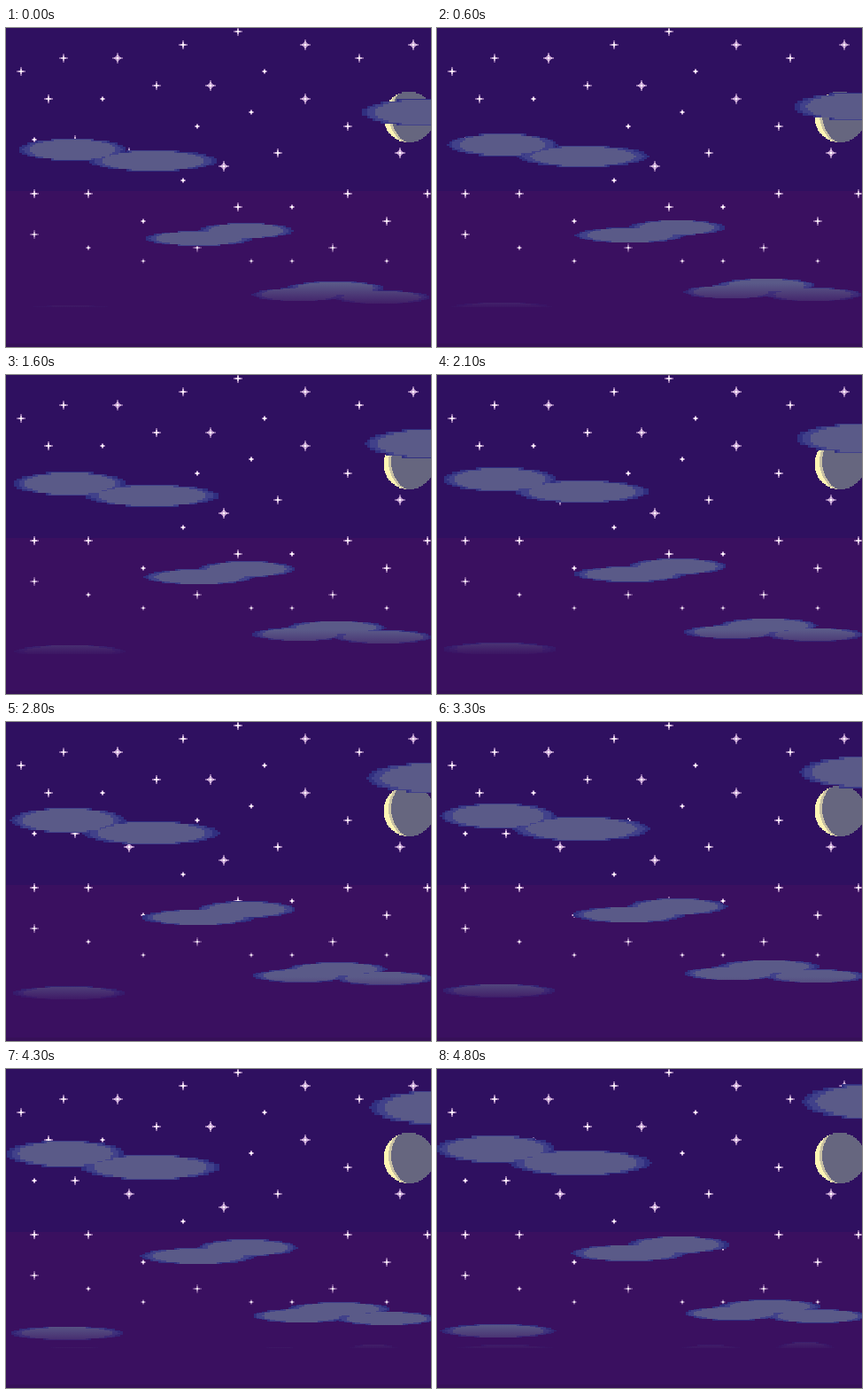
An HTML page with a canvas that plays this animation: 480x360 px, repeating every 4900 ms.

```html
<!DOCTYPE html>
<html lang="en">
<head>
<meta charset="utf-8">
<title>Night sky</title>
<style>
  html, body { margin: 0; width: 100%; height: 100%; overflow: hidden; background: #3a1060; }
  canvas { display: block; }
</style>
</head>
<body>
<canvas id="sky" width="480" height="360"></canvas>
<script>
const ctx = document.getElementById('sky').getContext('2d');
const STEPS = 49, HAZE = '58,16,96', CELL = 15.29;

// Stars sit on a coarse grid: the columns taken in each row
const starRows = [
  [17], [13, 22, 30], [4.15, 8.1, 26], [1, 19], [11, 15], [3, 7, 22], [18], [14, 25.15],
  [2, 5], [9, 20, 29], [16], [13], [2, 6, 25.15, 31], [17, 21], [10, 28], [2],
  [6, 14, 24], [10, 18, 21, 28]
];

// Each cloud is a group of lobes, given halfway through the loop: x, y, half width
const clouds = [
  [[70.5, 115, 64], [164, 129, 76]],
  [[480, 68, 73]],
  [[217.5, 223, 63], [272, 214, 55]],
  [[333, 288.5, 54], [374, 281, 56], [427, 291.5, 56]],
  [[71, 308, 63], [79, 331, 62]],
  [[308, 331, 38], [413, 328, 32]]
];
const layers = [['#312f80', 1, 1], ['#41418a', .92, .98], ['#5a5a88', .8, .93]];

const hash = n => { const s = Math.sin(n * 127.1) * 43758.5453; return s - Math.floor(s); };
const ellipse = (dy, rx, ry) => rx * Math.sqrt(Math.max(0, 1 - (dy / ry) ** 2));

function box(x0, y0, x1, y1, color) {
  const x = Math.round(x0), y = Math.round(y0);
  ctx.fillStyle = color;
  ctx.fillRect(x, y, Math.round(x1) - x, Math.round(y1) - y);
}

function starSize(col, row) {
  if (col > 2 && (col % 7 === 1 || col % 7 === 2)) return 3;
  return row > 16 || (col + row + 3) % 12 < 4 ? 1 : 2;
}

function drawStar(col, row, step) {
  const x = Math.round(1.7 + CELL * col), y = Math.round(3.5 + CELL * row);
  const size = starSize(Math.floor(col), row), reach = 1.5 + 1.6 * size;
  const glow = Math.min(1, (300 - y) / 90) * (.8 + .2 * hash(col * 61 + row * 17 + step));
  const plus = (r, w, color, alpha) => {
    ctx.globalAlpha = alpha * glow;
    box(x - r, y - w, x + r, y + w, color);
    box(x - w, y - r, x + w, y + r, color);
  };
  plus(reach, 1, '#d8b4e0', .6);
  plus(reach * .6, 1, '#f0d8f0', .8);
  if (size === 3) plus(3, 2, '#d8b4e0', .6);
  plus(1, 1, '#fff', 1);
  ctx.globalAlpha = 1;
}

function drawMoon() {
  const cx = 455, cy = 100.3, h = 1.5;
  for (let y = 72; y < 128.5; y += h) {
    const half = ellipse(y + h / 2 - cy, 28.5, 28.7);
    const shade = 463 - ellipse(y + h / 2 - 98, 28, 33);
    const left = cx - half, right = cx + half;
    box(left, y, right, y + h, '#fff5b4');
    box(Math.max(left, shade - 3), y, right, y + h, '#c8c0a4');
    box(Math.max(left, shade), y, right, y + h, '#66667f');
  }
}

// Clouds rise from the horizon, faster, wider and further apart the higher they are
function placeLobe([x, y, rx], u) {
  const reach = 215, speed = 24.5, horizon = 320;
  const angle = Math.atan((horizon - y) / reach) + speed / reach * (u - .5);
  const cy = horizon - reach * Math.tan(angle), rise = y - cy;
  return {
    cx: 225 + (x - 225) * (1 + .0013 * rise),
    cy,
    rx: rx * (1 + .002 * rise),
    ry: 7.5 + 9.5 * ((310 - cy) / 242) ** 2
  };
}

function drawLobe({ cx, cy, rx, ry }, [color, wide, tall]) {
  const rows = 11, h = ry * tall, rowHeight = 2 * h / rows;
  for (let i = 0; i < rows; i++) {
    const top = cy - h + i * rowHeight;
    const half = ellipse(top + rowHeight / 2 - cy, rx * wide, h);
    const w = Math.round(half / 3) * 3;
    box(cx - w, top, cx + w, top + rowHeight, color);
  }
}

const haze = ctx.createLinearGradient(0, 288, 0, 315);
haze.addColorStop(0, `rgba(${HAZE},0)`);
haze.addColorStop(1, `rgba(${HAZE},.93)`);

function draw(step) {
  box(0, 0, 480, 184, '#2f1060');
  box(0, 184, 480, 360, `rgb(${HAZE})`);
  starRows.forEach((cols, row) => cols.forEach(col => drawStar(col, row, step)));
  drawMoon();
  for (const cloud of clouds) {
    const lobes = cloud.map(lobe => placeLobe(lobe, step / (STEPS - 1)));
    for (const layer of layers) lobes.forEach(lobe => drawLobe(lobe, layer));
  }
  box(0, 288, 480, 315, haze);
  box(0, 315, 480, 360, `rgb(${HAZE})`);
  box(0, 356, 480, 360, '#361058');
}

const start = performance.now();
function tick() {
  draw(Math.floor((performance.now() - start) / 100) % STEPS);
  requestAnimationFrame(tick);
}
tick();
</script>
</body>
</html>
```
